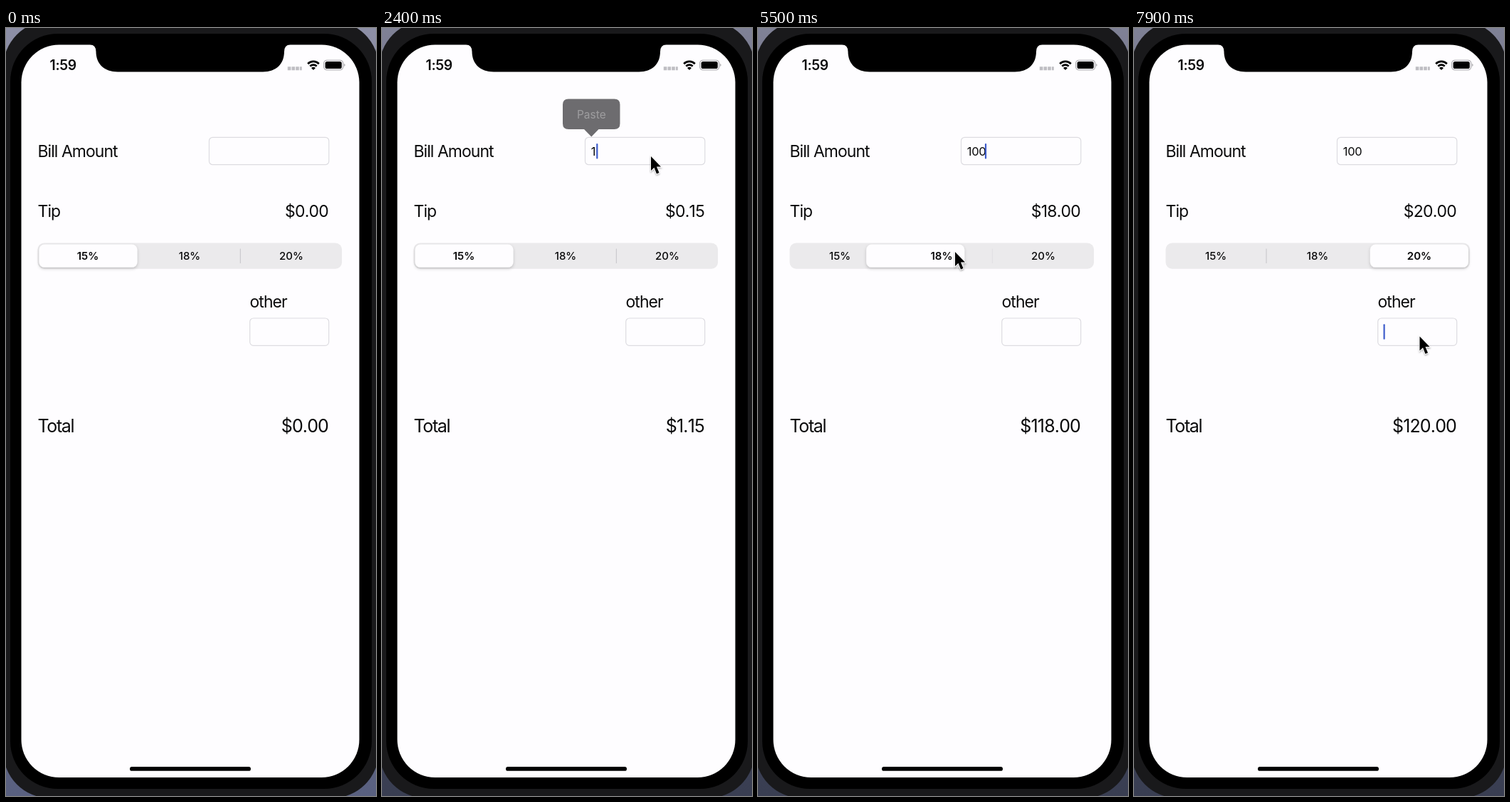
These frames come from a looping animation (520 by 1077 pixels, 8 s). An HTML page:

```html
<!DOCTYPE html>
<html lang="en">
<head>
<meta charset="utf-8">
<title>Tip calculator</title>
<style>
  html, body { margin: 0; width: 100%; height: 100%; overflow: hidden; }
  svg { display: block; width: 100%; height: 100%; }
  text { font-family: Inter, Roboto, sans-serif; font-optical-sizing: none; fill: #0b0b0c; }
  .label { font-size: 23px; letter-spacing: -.042em; }
  .total { font-size: 25px; letter-spacing: -.055em; }
  .entry { font-size: 16.5px; letter-spacing: -.02em; }
  .segment { font-size: 15px; font-weight: 500; text-anchor: middle; }
  .segment.on { font-weight: 600; }
  .end { text-anchor: end; letter-spacing: -.034em; font-kerning: none; font-feature-settings: "calt" 0; }
  .field { fill: #fefdff; stroke: #dddce1; stroke-width: 1.2; }
</style>
</head>
<body>
<svg viewBox="0 0 520 1077">
  <defs>
    <linearGradient id="desk" x2="0" y2="1">
      <stop stop-color="#8d8fa6"/><stop offset="1" stop-color="#596080"/>
    </linearGradient>
    <linearGradient id="windowShadow" x2="0" y2="1">
      <stop stop-opacity=".1"/><stop offset="1" stop-opacity=".36"/>
    </linearGradient>
    <filter id="thumbShadow" x="-10%" y="-30%" width="120%" height="170%">
      <feDropShadow dx="0" dy="2" stdDeviation="2" flood-opacity=".2"/>
    </filter>
    <filter id="cursorShadow" x="-50%" y="-30%" width="200%" height="170%">
      <feDropShadow dx="0" dy="1.5" stdDeviation="1.3" flood-opacity=".35"/>
    </filter>
  </defs>

  <!-- Phone -->
  <rect width="520" height="1077" fill="url(#desk)"/>
  <rect id="focusShade" width="520" height="1077" fill="url(#windowShadow)"/>
  <rect x="-4" y="-10" width="528" height="1090" rx="66" fill="#19191b"/>
  <rect x="6" y="8" width="508" height="1059" rx="67" fill="#000"/>
  <rect x="21.5" y="23.5" width="475" height="1027.5" rx="53" fill="#fefdff"/>
  <path d="M118 23Q126.5 24 126.5 33C126.5 50 138 61.5 157 61.5H361C380 61.5 391 50 391 33Q391 24 399.5 23Z"/>
  <rect x="174" y="1036" width="170" height="5.8" rx="2.9"/>

  <!-- Status bar -->
  <text x="61.5" y="58.7" font-size="19.4" font-weight="600" letter-spacing="-.3">1:59</text>
  <path d="M398 56.7H418" stroke="#bfbec3" stroke-width="5" stroke-dasharray="4.6 1.1" transform="translate(-2.2)"/>
  <g fill="none" stroke="#000" stroke-width="2.7">
    <path d="M424.2 50.2A11 11 0 0 1 439.8 50.2"/>
    <path d="M427.3 53.6A6.6 6.6 0 0 1 436.7 53.6"/>
  </g>
  <path d="M432 59L429 56Q432 53.3 435 56Z"/>
  <rect x="446.7" y="45.2" width="27" height="13.6" rx="4.2" fill="none" stroke="#a3a2a6" stroke-width="1.1"/>
  <rect x="448.6" y="47" width="23.2" height="10" rx="2.6"/>
  <path d="M475.2 49.8Q478 52 475.2 54.2Z" fill="#a3a2a6"/>

  <!-- Form -->
  <text class="label" x="44.5" y="181">Bill Amount</text>
  <rect class="field" x="285.5" y="153.3" width="168.3" height="38.4" rx="5"/>
  <text class="entry" id="bill" x="293.8" y="179"></text>
  <text class="label" x="44.5" y="265">Tip</text>
  <text class="label end" id="tip" x="453" y="265"></text>
  <rect x="44.5" y="301.5" width="427.6" height="36.2" rx="9" fill="#ebeaec"/>
  <path id="leftDivider" d="M186 309.5V330" stroke="#cbcacf" stroke-width="1.2"/>
  <path id="rightDivider" d="M329.4 309.5V330" stroke="#cbcacf" stroke-width="1.2"/>
  <rect id="thumb" y="303.6" width="138" height="32" rx="7.5" fill="#fefdff" filter="url(#thumbShadow)"/>
  <text class="segment" x="115" y="325">15%</text>
  <text class="segment" x="258" y="325">18%</text>
  <text class="segment" x="401" y="325">20%</text>
  <text class="label" x="342.5" y="392">other</text>
  <rect class="field" x="342.7" y="407" width="111" height="38.3" rx="5"/>
  <text class="total" x="44.5" y="567">Total</text>
  <text class="total end" id="total" x="453" y="567"></text>

  <rect id="caret" x="-1.1" width="2.2" height="21.5" rx="1" fill="#3e5ccb"/>
  <g id="popup">
    <path d="M262 99.5H326.5Q334.5 99.5 334.5 107.5V134Q334.5 142 326.5 142H304.5L294.3 152.5L284 142H262Q254 142 254 134V107.5Q254 99.5 262 99.5Z" fill="#262528"/>
    <text id="paste" x="294.3" y="126.5" font-size="15.5" text-anchor="middle" style="fill:#fff">Paste</text>
  </g>
  <path id="cursor" d="M0 0V20L4.5 15.8L8 24.5L11.5 23L8 14.6H14Z" stroke="#fff" stroke-width="1.6" paint-order="stroke" filter="url(#cursorShadow)"/>
</svg>
<script>
const LOOP = 8000, FRAME = 100;
const $ = id => document.getElementById(id);
const segments = document.querySelectorAll('.segment');
const clamp = v => Math.min(1, Math.max(0, v));
const smooth = v => { v = clamp(v); return v * v * (3 - 2 * v); };

// Each key is [time, value, value...]; values in between are linear.
function track(keys, t) {
  const next = keys.findIndex(k => k[0] > t);
  if (next < 0) return keys.at(-1).slice(1);
  if (next === 0) return keys[0].slice(1);
  const a = keys[next - 1], b = keys[next];
  const p = (t - a[0]) / (b[0] - a[0]);
  return a.slice(1).map((v, i) => v + (b[i + 1] - v) * p);
}

const cursorPath = [
  [700, 535, 60], [900, 450, 115], [1200, 378, 180],
  [3900, 378, 180], [4300, 291.5, 292.5], [4500, 278, 312], [4800, 277, 314],
  [5500, 277, 314], [5700, 404, 312], [5900, 413, 310.5],
  [6700, 413, 310.5], [7100, 405, 405], [7400, 402, 436], [7500, 402, 436], [7600, 401.5, 432.5]
];
const openingBlink = [[100, 0], [400, 1], [700, 1], [1000, 0], [1100, 0], [1400, 1], [2000, 1], [2200, .05], [2300, .05]];
const blink = [[0, 1], [100, .8], [300, .2], [350, 0], [400, .3], [500, 1]];
const popupFade = [[1700, 0], [1800, .7], [1900, 1], [2300, 1], [2600, 0]];
const caretStops = [294.5, 302.3, 310.8, 320];
const rates = [.15, .18, .2];

function caretOpacity(t) {
  if (t < 2400) return track(openingBlink, t)[0];
  if (t < 4000 || t >= 7800) return 1;
  return track(blink, t % 1000)[0];
}

function draw(t) {
  const typed = '100'.slice(0, [2400, 2900, 3400].filter(s => t >= s).length);
  const selected = [5300, 6400].filter(s => t >= s).length;
  const tip = typed * rates[selected];
  $('bill').textContent = typed;
  $('tip').textContent = '$' + tip.toFixed(2);
  $('total').textContent = '$' + (+typed + tip).toFixed(2);

  const slide = smooth((t - 5300) / 300) + smooth((t - 6340) / 300);
  $('thumb').setAttribute('x', 46.5 + 142.7 * slide);
  $('leftDivider').setAttribute('opacity', clamp(slide - 1));
  $('rightDivider').setAttribute('opacity', clamp(1 - slide));
  segments.forEach((s, i) => s.classList.toggle('on', i === selected));

  const [x, y] = t < 7800 ? [caretStops[typed.length], 162] : [351.6, 415.3];
  $('caret').setAttribute('transform', `translate(${x} ${y})`);
  $('caret').setAttribute('opacity', caretOpacity(t));

  const [shown] = track(popupFade, t);
  $('popup').setAttribute('opacity', shown);
  $('paste').setAttribute('opacity', clamp(shown * 2 - 1));
  $('cursor').setAttribute('transform', `translate(${track(cursorPath, t)})`);
  $('focusShade').setAttribute('opacity', t < 1200 ? 0 : 1);
}

const start = performance.now();
function tick() {
  const t = (performance.now() - start) % LOOP;
  draw(Math.floor(t / FRAME) * FRAME);
  requestAnimationFrame(tick);
}
tick();
</script>
</body>
</html>
```
